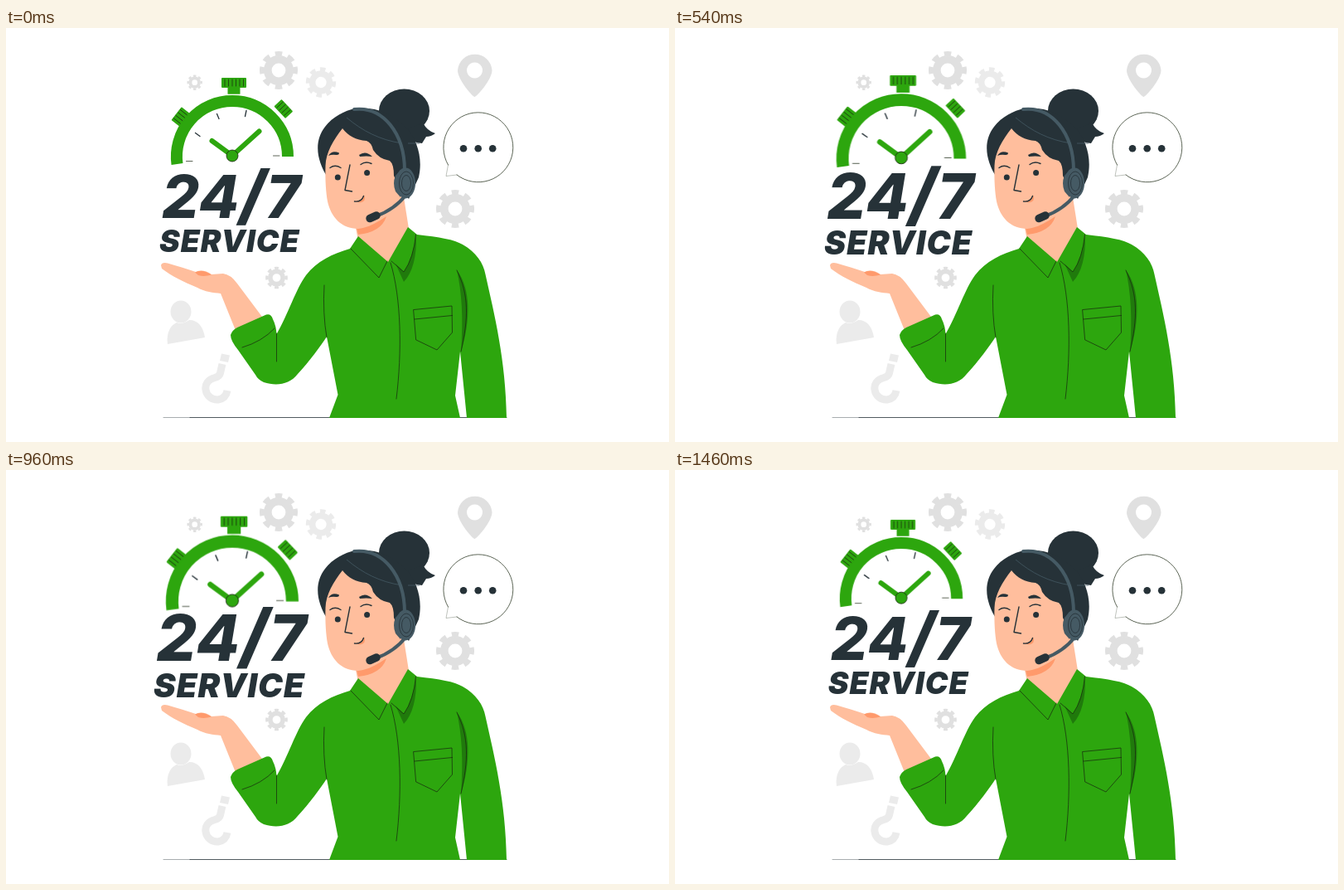
An HTML page that plays this animation: 800x499 px, repeating every 1500 ms.

```html
<!DOCTYPE html>
<html lang="en">
<head>
<meta charset="utf-8">
<title>24/7 service</title>
<style>
  html, body { margin: 0; width: 100%; height: 100%; overflow: hidden; background: #fff; }
  svg { display: block; width: 100vw; height: 100vh; }
  .green { fill: #2da60e; }
  .shade { fill: #207a0c; }
  .dark { fill: #263238; }
  .steel { fill: #455a64; }
  .skin { fill: #ffbe9d; }
  .blush { fill: #ff9a6c; }
  .line { fill: none; stroke: #17240f; stroke-width: .7; stroke-linecap: round; stroke-linejoin: round; }
  .ink { fill: none; stroke: #263238; stroke-linecap: round; stroke-linejoin: round; }
  .faint { opacity: .4; }
  .grey { color: #e0e0e0; }
  .pale { color: #ebebeb; }
  .pulse { animation: pulse 750ms infinite; }
  #clock { transform-origin: 273px 112px; }
  #label { transform-origin: 272px 219.5px; }
  #label text { font-family: Inter, "Open Sans", sans-serif; font-weight: 800; font-style: italic; }
  #label .word { font-weight: 900; }
  @keyframes pulse {
    0% { transform: scale(1); animation-timing-function: ease; }
    50% { transform: scale(1.095); animation-timing-function: ease-in-out; }
    100% { transform: scale(1); }
  }
</style>
</head>
<body>
<svg viewBox="0 0 800 499">
  <defs>
    <g id="gear" fill="none" stroke="currentColor">
      <circle r="13.2" stroke-width="9.6"/>
      <circle r="20" stroke-width="6" pathLength="8" stroke-dasharray=".54 .46" stroke-dashoffset=".27"/>
    </g>
    <g id="cap">
      <rect class="green" x="-10" y="-6" width="20" height="12.5" rx="1"/>
      <path class="line" d="M-6.5-5V5M-2.2-5V5M2.2-5V5M6.5-5V5"/>
    </g>
  </defs>

  <!-- background icons -->
  <g class="grey">
    <use href="#gear" transform="translate(329 51)"/>
    <use href="#gear" transform="translate(542 218)"/>
    <use href="#gear" transform="translate(326.5 301) scale(.58)"/>
    <path fill="currentColor" fill-rule="evenodd" d="M565.5 83C563 83 545 62 545 51A20.8 20.8 0 0 1 586.5 51C586.5 62 568 83 565.5 83ZM565.5 41.5a9.5 9.5 0 1 0 .01 0Z"/>
  </g>
  <g class="pale">
    <use href="#gear" transform="translate(380 65.5) rotate(8) scale(.79)"/>
    <use href="#gear" transform="translate(227.7 65.7) scale(.4)" color="#e0e0e0"/>
    <ellipse cx="211" cy="342" rx="12.5" ry="13.5" fill="currentColor"/>
    <path fill="currentColor" d="M195 381C193 367 199 358 206 355Q212 358 221 352C232 352 238 360 240 373Z"/>
    <path fill="currentColor" d="M260 392.5L270 394.5L268 403L258 401Z"/>
    <path fill="none" stroke="currentColor" stroke-width="9" d="M261 405L258.5 416Q257.5 420 252 421.5C243 424 240 430 241 436C242 444 249 448.5 256 448C262 447 266 443 267 437"/>
  </g>

  <!-- speech bubble -->
  <path class="line" d="M533.5 165A42 42 0 1 1 544 177"/>
  <path class="line faint" d="M533.5 165L531 178.5L544 177"/>
  <g class="dark"><circle cx="552" cy="145.3" r="4.3"/><circle cx="569.7" cy="145.3" r="4.3"/><circle cx="587.2" cy="145.3" r="4.3"/></g>

  <path class="ink faint" d="M190 469.5H222"/>
  <path class="ink" stroke-width=".8" d="M222 469.5H604"/>

  <!-- stopwatch -->
  <g id="clock" class="pulse">
    <path fill="none" stroke="#2da60e" stroke-width="14" d="M206.5 164A67 67 0 0 1 273 88A67 67 0 0 1 340 155"/>
    <rect class="green" x="267.5" y="71" width="15" height="8.7"/>
    <rect class="green" x="260" y="60" width="30" height="12" rx="1"/>
    <path class="line" d="M264 62V70M268.5 62V70M273 62V70M277.5 62V70M282 62V70M286.5 62V70"/>
    <use href="#cap" transform="translate(210.3 106.8) rotate(-52)"/>
    <use href="#cap" transform="translate(335 97.3) rotate(47)"/>
    <path class="ink" stroke-width="1.3" d="M228.5 126.5L234 130.5M254.5 103.5L257 109.5M290 99.5L288.5 106.5"/>
    <path class="line" d="M217.5 160.5H225M322.5 154H330"/>
    <path fill="none" stroke="#2da60e" stroke-width="6" stroke-linecap="round" d="M248.5 136L273 154L305.5 124.5"/>
    <circle class="green" cx="273" cy="154" r="7" stroke="#17240f" stroke-width=".8"/>
  </g>

  <!-- lettering -->
  <g id="label" class="pulse dark">
    <text x="188" y="229" font-size="71" letter-spacing=".3">24<tspan font-size="79">/</tspan>7</text>
    <text class="word" x="185" y="270" font-size="37" letter-spacing="1">SERVICE</text>
  </g>

  <!-- hair behind the face -->
  <g class="dark">
    <ellipse cx="480.5" cy="100" rx="30.5" ry="26.5"/>
    <path d="M503 114Q508 124 518 127Q513 131 507 131L502 139Q488 138 474 126Z"/>
    <path d="M388 180C375 160 371 137 385 119C394 107 409 99.500 421 97C445 94 466 103 482 119C497 135 503 158 498 180L486 206L465 180L441 146Z"/>
  </g>

  <!-- neck and face -->
  <path class="skin" d="M421 236L425 256L461 284L486 242L480 204L462 180Z"/>
  <path class="blush" d="M423 241Q444 238 459 227Q453 246 425 249Z"/>
  <path class="skin" d="M406 121C395 135 386 150 385.5 166C385 183 386 198 388 209C392 228 405 242 425 242C443 240 460 228 471 211L478 200L468 178Q468 164 463 160Q450 158 443 147Q441 138 435 136C422 135 413 130 406 121Z"/>
  <g class="dark">
    <path d="M389 154Q393 147 402 150.5Q402 153 399 153Q393 152 389 154Z"/>
    <path d="M426 153Q434 147 442 155Q435 154 427 155Z"/>
    <circle cx="400.3" cy="180" r="3.5"/><circle cx="435.6" cy="174.500" r="3.5"/>
  </g>
  <path class="blush" d="M421 209Q429 209 432.5 202Q435 209 427 210.500Z"/>
  <path class="ink" stroke-width="1.4" d="M391 168.5Q397 164 404 168.5M428 164.5Q434 160 441 163.5M415 165L409 195.5L417.500 197M420.5 209Q429 210 431.5 202.5"/>

  <!-- headset -->
  <path fill="none" stroke="#455a64" stroke-width=".8" d="M411 108C430 124 451 135 478 139M485 139H499"/>
  <path fill="none" stroke="#455a64" stroke-width="4" stroke-linecap="round" d="M420 98C455 94 481 127 481 172M481 203C474 212 461 222 447 226.5"/>
  <path class="steel" d="M470 178Q466 187 470 197L476 204V171Z"/>
  <g fill="#455a64" stroke="#263238" stroke-width=".8">
    <ellipse cx="482" cy="187" rx="12" ry="18.5" stroke="none"/>
    <ellipse cx="483" cy="187" rx="8.5" ry="14"/><ellipse cx="483" cy="187" rx="5.5" ry="9.5"/>
  </g>
  <rect class="dark" x="434" y="223" width="18" height="9.5" rx="4.5" transform="rotate(-24 443 227.7)"/>

  <!-- hand -->
  <path class="skin" d="M187 286Q188 282 195 283.5C206 287 218 290 229 294Q238 290 248 297L262 296Q271 297 279 308L312 352L278 370L276 362L259 320C250 319 240 318 231 313C214 306 200 299 188 290Z"/>
  <path class="blush" d="M228 294.5Q237 290 248 297.5Q239 300 232 298Z"/>

  <!-- shirt -->
  <path class="green" d="M425 251L461 282L485 240L496 249C523 252 541 255 551 261C567 270 576 283 578.5 297C589.5 346 603 400 604 470H556L548 390L542 443L548 470H390L400.5 442L387 372C380 383 366 402 352 417C342 430 326 432 311 427Q304 424 301 418L280 388Q271 377 271 370Q273 364 279 361L314 345.5Q320 344 322 351Q326 359 326.5 369C340 346 350 314 362 298C375 281 394 272 415 266Z"/>
  <path class="shade" d="M544 292C561 314 561 352 549 390C552 350 550 318 544 292Z"/>
  <path class="shade" d="M470 284L480 306Q496 289 495 249Q490 280 480 294Z"/>
  <path class="line" d="M416 266L450 301L460 281M465 281L480 294Q492 277 494.5 249M464 283C477 325 478 390 471 447M492 339.5L538 335L538.5 367L520 388L495 376ZM493 351L538.5 346.5M384 310Q382 344 387 373M326.5 368V402M285 385Q309 378 324 362M544 292C559 322 558 350 549 390"/>
</svg>
</body>
</html>
```
